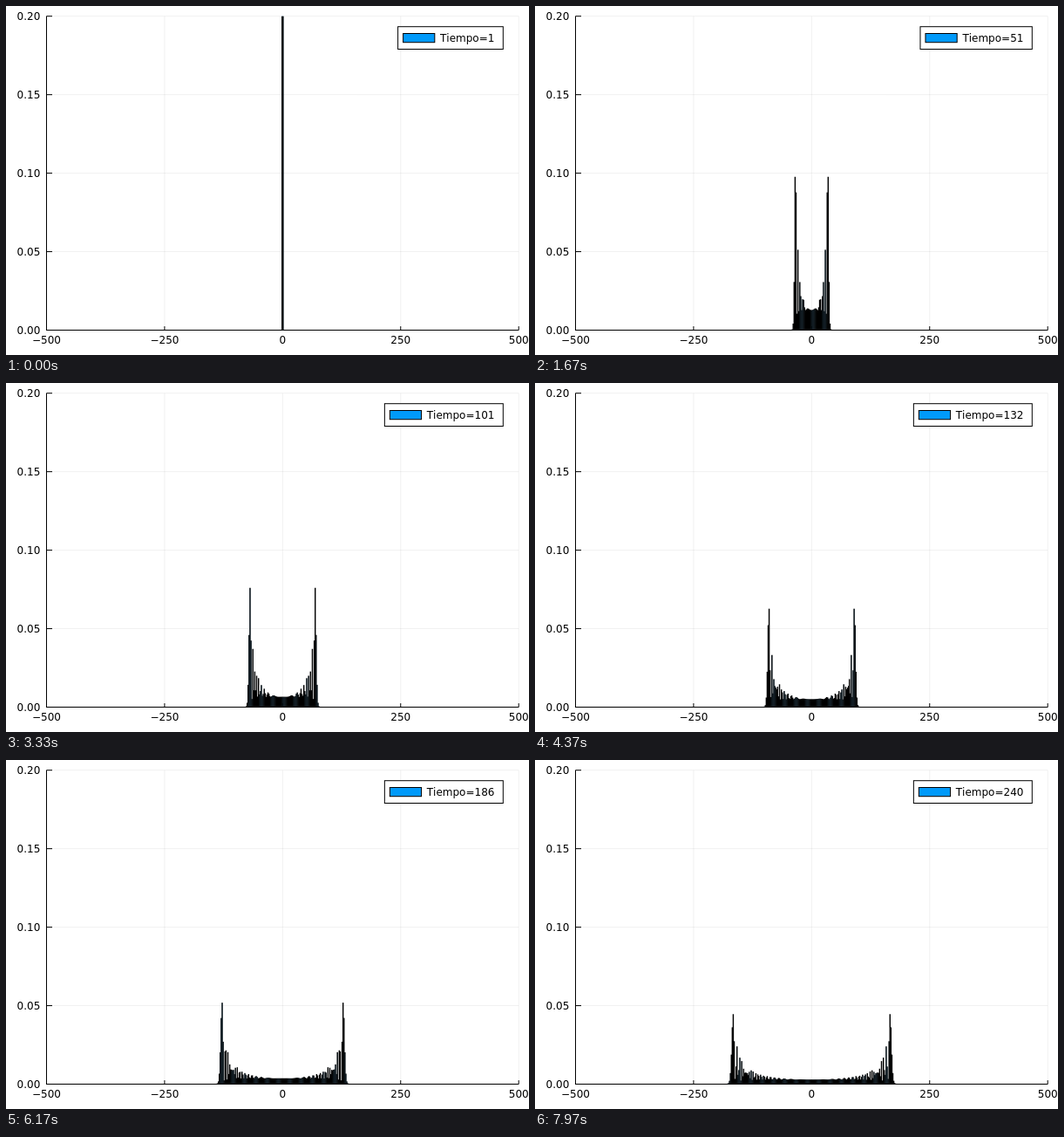
Animation, 600 px wide and 400 px high, one loop 8 s. Source, as an HTML page with a canvas:

```html
<!DOCTYPE html>
<html lang="es">
<head>
<meta charset="utf-8">
<title>Caminata cuántica</title>
<style>
  html, body { margin: 0; width: 100%; height: 100%; overflow: hidden; background: #fff; }
  canvas { display: block; }
</style>
</head>
<body>
<canvas id="stage" width="600" height="400"></canvas>
<script>
const ctx = document.getElementById('stage').getContext('2d');
const LOOP = 8000, STEPS = 240;
const LEFT = 46.5, RIGHT = 588.2, TOP = 11.7, BOTTOM = 371.5;
const X_MAX = 500, Y_MAX = 0.2, BAR_WIDTH = 0.8;
const BLUE = '#009afa';

const toX = x => LEFT + (x + X_MAX) / (2 * X_MAX) * (RIGHT - LEFT);
const toY = y => BOTTOM - y / Y_MAX * (BOTTOM - TOP);

// Hadamard walk from one coin state; mirroring it gives the symmetric walk.
function walkDistributions(steps) {
  const size = 2 * steps + 1;
  let left = new Float64Array(size), right = new Float64Array(size);
  left[steps] = 1;
  const all = [];
  for (let n = 1; n <= steps; n++) {
    const nextLeft = new Float64Array(size), nextRight = new Float64Array(size);
    for (let i = steps - n + 1; i < steps + n; i++) {
      nextLeft[i - 1] = (left[i] + right[i]) * Math.SQRT1_2;
      nextRight[i + 1] = (left[i] - right[i]) * Math.SQRT1_2;
    }
    left = nextLeft;
    right = nextRight;
    const prob = i => left[i] ** 2 + right[i] ** 2;
    const bars = [];
    for (let x = -n; x <= n; x += 2) {
      bars.push({ x, p: (prob(steps + x) + prob(steps - x)) / 2 });
    }
    all.push(bars);
  }
  return all;
}

function line(x1, y1, x2, y2) {
  ctx.beginPath();
  ctx.moveTo(x1, y1);
  ctx.lineTo(x2, y2);
  ctx.stroke();
}

function box(x, y, w, h, fill) {
  ctx.fillStyle = fill;
  ctx.fillRect(x, y, w, h);
  ctx.strokeRect(x, y, w, h);
}

function label(text, x, y, align) {
  ctx.fillStyle = '#000';
  ctx.textAlign = align;
  ctx.fillText(text, x, y);
}

function drawAxes() {
  const xTicks = [-500, -250, 0, 250, 500], yTicks = [0, 0.05, 0.1, 0.15, 0.2];

  ctx.strokeStyle = 'rgba(0,0,0,0.1)';
  ctx.lineWidth = 0.6;
  xTicks.forEach(v => line(toX(v), TOP, toX(v), BOTTOM));
  yTicks.forEach(v => line(LEFT, toY(v), RIGHT, toY(v)));

  ctx.strokeStyle = '#000';
  ctx.lineWidth = 1;
  line(LEFT, TOP, LEFT, BOTTOM + 0.5);
  line(LEFT, BOTTOM, RIGHT, BOTTOM);
  for (const v of xTicks) {
    line(toX(v), BOTTOM, toX(v), BOTTOM - 4.4);
    label(String(v).replace('-', '\u2212'), toX(v), 387, 'center');
  }
  for (const v of yTicks) {
    line(LEFT, toY(v), LEFT + 6.5, toY(v));
    label(v.toFixed(2), 39.3, toY(v) + 4.4, 'right');
  }
}

function drawBars(bars) {
  ctx.save();
  ctx.beginPath();
  ctx.rect(LEFT, TOP, RIGHT - LEFT, BOTTOM + 0.5 - TOP);
  ctx.clip();
  const width = toX(BAR_WIDTH) - toX(0);
  for (const { x, p } of bars) {
    box(toX(x - BAR_WIDTH / 2), toY(p), width, BOTTOM - toY(p), BLUE);
  }
  ctx.restore();
}

function drawLegend(time) {
  const text = 'Tiempo=' + time;
  const textX = 560.4 - ctx.measureText(text).width;
  const x = textX - 48.4;
  box(x, 23.7, 570.3 - x, 25.8, '#fff');
  box(x + 6, 31.5, 36.2, 10.2, BLUE);
  label(text, textX, 41.2, 'left');
}

const distributions = walkDistributions(STEPS);

function render(now) {
  const ms = now % LOOP;
  const index = Math.min(STEPS - 1, Math.floor((ms + 3.4) * 0.03));
  ctx.fillStyle = '#fff';
  ctx.fillRect(0, 0, 600, 400);
  ctx.font = '12px "DejaVu Sans", sans-serif';
  ctx.fontKerning = 'none';
  drawAxes();
  drawBars(distributions[index]);
  drawLegend(index + 1);
}

const start = performance.now();
function tick() {
  render(performance.now() - start);
  requestAnimationFrame(tick);
}
tick();
</script>
</body>
</html>
```
